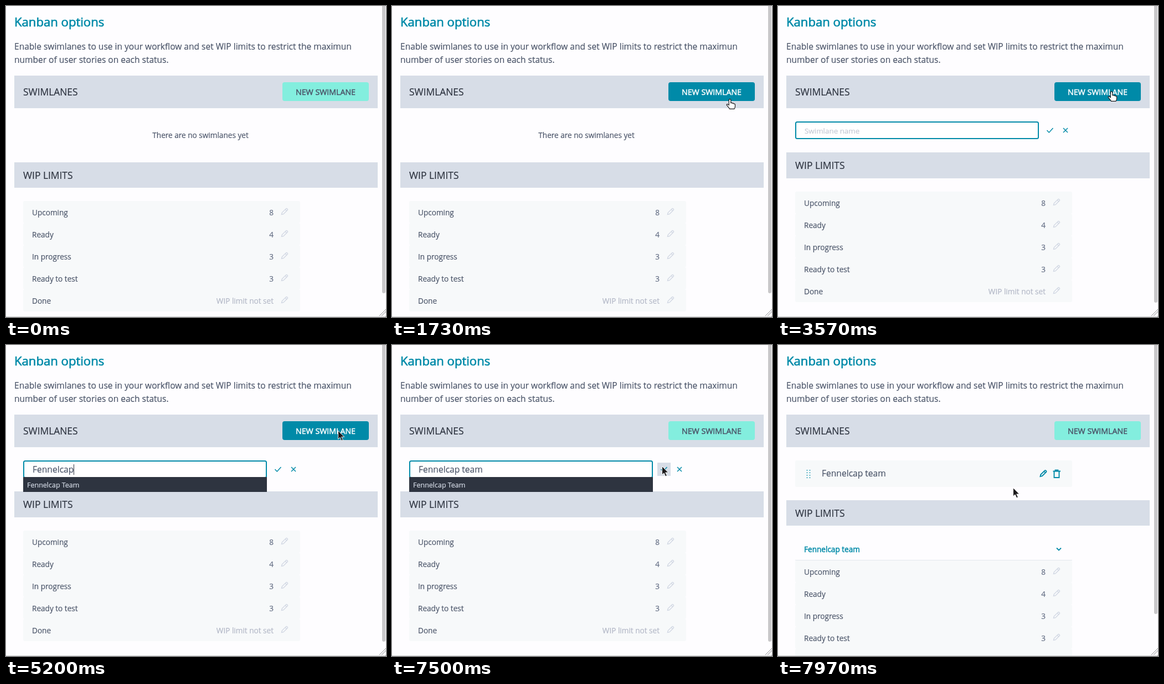
Recreate the animation shown at these times as an HTML page. Size 686 px wide and 563 px high, loop 8 s.

```html
<!DOCTYPE html>
<html lang="en">
<head>
<meta charset="utf-8">
<title>Kanban options</title>
<style>
  html, body { margin: 0; width: 100%; height: 100%; overflow: hidden; background: #fefdff; }
  svg { display: block; width: 686px; height: 563px; }
  text {
    font: 13.6px 'Open Sans', 'Noto Sans', sans-serif; white-space: pre;
    color: #4c566a; fill: currentColor; stroke: currentColor; stroke-width: .2;
  }
  .title { font-size: 22.1px; color: #008aa8; stroke-width: .7; }
  .body { font-size: 15.53px; }
  .head { font-size: 17.4px; color: #2e3440; }
  .medium { stroke-width: .5; }
  .bar { fill: #d7dde7; }
  .row { fill: #f7f9fa; }
  .icon { fill: none; stroke: #008aa8; stroke-width: 1.5; }
  .bold { stroke-width: 1.9; }
  .pale { stroke: #d0d6e2; stroke-width: 1.3; }
</style>
</head>
<body>
<svg viewBox="0 0 686 563">
  <defs>
    <path id="pencil" d="M1 12l.8-3.4L9 1.4q1-.9 2 0l.6.6q.9 1 0 2L4.400 11.200zM7.600 2.800l2.600 2.600"/>
  </defs>

  <text class="title" x="15" y="37">Kanban options</text>
  <text class="body" x="15" y="79">Enable swimlanes to use in your workflow and set WIP limits to restrict the maximun</text>
  <text class="body" x="15" y="103">number of user stories on each status.</text>

  <rect class="bar" x="15" y="126" width="656" height="59"/>
  <text class="head" x="31" y="162">SWIMLANES</text>
  <rect id="button" x="499" y="138" width="156" height="34" rx="4"/>
  <text id="label" class="medium" x="577" y="161" text-anchor="middle" style="font-size:14.2px">NEW SWIMLANE</text>

  <text id="empty" x="351" y="239" text-anchor="middle">There are no swimlanes yet</text>

  <rect id="wipBar" class="bar" x="15" width="656"/>
  <text id="wipHead" class="head" x="31">WIP LIMITS</text>
  <g id="rows"></g>

  <g id="form">
    <rect id="field" x="32" y="210" width="438" height="30" rx="2.5" fill="#fff" stroke-width="2"/>
    <text id="hint" x="48" y="231" style="font-size:13.4px;color:#c4c8d3">Swimlane name</text>
    <text id="typed" x="48" y="231" style="font-size:15.6px"></text>
    <rect id="caret" y="216" width="1" height="19" fill="#2e3440"/>
    <rect id="checkBack" class="bar" x="479" y="213" width="24" height="24"/>
    <path class="icon" d="M485.5 225l3.800 4 7.200-8M515 221l8 8m0-8l-8 8"/>
    <g id="suggest">
      <rect x="31" y="239" width="440" height="27" fill="#2e3440"/>
      <text x="38" y="258" style="font-size:12.5px;color:#d8dee9">Fennelcap Team</text>
    </g>
  </g>

  <g id="lane">
    <rect class="row" x="31" y="209" width="500" height="48" rx="3"/>
    <path d="M52.500 226v16m5-16v16" stroke="#008aa8" stroke-width="1.6" stroke-dasharray="1.600 2.900"/>
    <text x="79" y="238" style="font-size:15.6px">Fennelcap team</text>
    <use href="#pencil" class="icon bold" x="472.500" y="226"/>
    <path class="icon bold" d="M496.500 228.500h13.500m-9.500 0v-2h5v2m-7 0v11.500h9v-11.500"/>
    <text class="medium" x="47" y="375" style="color:#008aa8">Fennelcap team</text>
    <path class="icon bold" d="M503 367.500l4 4 4-4"/>
    <path d="M31 389.500h500" stroke="#e3e8ed"/>
  </g>

  <rect id="thumb" x="679" y="-6" width="6" rx="3" fill="#c8c7c9"/>
  <path d="M674 561l12-12m-8 12l8-8m-4 12l4-4" stroke="#8d8d8f" fill="none"/>
  <path d="M0 562.500h686" stroke="#d3d3d5"/>

  <g id="cursor">
    <path id="arrow" d="M0 0v15.500l3.500-3.200 2.700 6 2.700-1.200-2.700-5.700h5z" fill="#1c1a1c" stroke="#fff" stroke-width=".9"/>
    <path id="hand" d="M-1.700 1.500a1.700 1.700 0 0 1 3.400 0V6.500Q3.500 5.800 4.600 7.200 6.200 6.600 7 8 9.300 7.600 9.500 9.800V13q0 2-1.600 4.400H-.5q-1-2-5-6.600-.8-2 1-2.200L-1.700 10.500z" fill="#fff" stroke="#1c1a1c" stroke-width="1.200"/>
  </g>
</svg>
<script>
const LOOP = 8000;
const OPEN = 2330, TYPE = 3930, BLUR = 7530, SAVE = 7770;
const name = 'Fennelcap team';
// when each letter of the name is typed
const keys = [3930, 4130, 4270, 4400, 4570, 4730, 4870, 5030, 5200, 5370, 5500, 6030, 6170, 6300];
// time, x, y of the pointer tip
const path = [
  [1000, 49, 18], [1400, 469, 241], [1570, 469, 241], [1730, 610, 169], [1890, 601, 154],
  [2829, 601, 154], [2830, 602, 155], [3929, 602, 155], [3930, 599.5, 155],
  [7070, 599.5, 155], [7500, 487.5, 219.5], [7770, 487.5, 219.5], [7970, 424.5, 258.5]
];
// layout: empty, form, saved
const layouts = [
  { bar: 283, barH: 46, rows: 353, thumb: 520 },
  { bar: 265, barH: 47, rows: 336, thumb: 537 },
  { bar: 281, barH: 46, rows: 390, thumb: 487 }
];

const $ = id => document.getElementById(id);
const show = (id, on) => $(id).style.display = on ? '' : 'none';
const set = (id, attrs) => { for (const k in attrs) $(id).setAttribute(k, attrs[k]); };
const clamp = v => Math.max(0, Math.min(1, v));
const mix = (a, b, p) => a + (b - a) * p;
const within = (t, a, b) => t >= a && t < b;

const limits = [['Upcoming', 8], ['Ready', 4], ['In progress', 3], ['Ready to test', 3], ['Done', 0]];
$('rows').innerHTML = limits.map(([status, limit], i) => `
  <g transform="translate(0 ${i * 40})">
    <rect class="row" x="31" width="500" height="40" rx="3"/>
    <text x="47" y="26">${status}</text>
    <text x="483" y="26" text-anchor="end" style="color:${limit ? '#667086' : '#b3b8c7'}">${limit || 'WIP limit not set'}</text>
    <use href="#pencil" class="icon pale" x="496.5" y="12.500"/>
  </g>`).join('');

function pointer(t) {
  const i = path.findIndex(p => p[0] > t);
  if (i < 0) return path[path.length - 1].slice(1);
  const a = path[Math.max(0, i - 1)], b = path[i];
  const p = clamp((t - a[0]) / (b[0] - a[0]));
  return [mix(a[1], b[1], p), mix(a[2], b[2], p)];
}

function draw(t) {
  const stage = t < OPEN ? 0 : t < SAVE ? 1 : 2;
  const { bar, barH, rows, thumb } = layouts[stage];
  set('wipBar', { y: bar, height: barH });
  set('wipHead', { y: bar + 30 });
  set('rows', { transform: `translate(0 ${rows})` });
  set('thumb', { height: thumb + 6 });
  show('empty', stage === 0);
  show('form', stage === 1);
  show('lane', stage === 2);

  const [x, y] = pointer(t);
  const hover = within(x, 499, 655) && within(y, 138, 172);
  show('cursor', t >= 1000);
  set('cursor', { transform: `translate(${x} ${y})` });
  show('hand', hover && t < TYPE);
  show('arrow', !hover || t >= TYPE);
  set('button', { fill: hover ? '#008aa8' : '#83eede' });
  $('label').style.color = hover ? '#fff' : '#4c566a';

  if (stage !== 1) return;
  const count = keys.filter(k => k <= t).length;
  const focus = clamp((t - OPEN) / 300) * (1 - clamp((t - BLUR) / 70));
  const rgb = [[216, 0], [222, 138], [233, 168]].map(([a, b]) => Math.round(mix(a, b, focus)));
  set('field', { stroke: `rgb(${rgb})` });
  $('typed').textContent = name.slice(0, count);
  show('hint', !count);
  set('caret', { x: 48 + (count ? Math.round($('typed').getComputedTextLength()) : 0) });
  show('caret', t < 7100 && !within(t, 3570, TYPE) && !within(t, 5970, 6030));
  show('checkBack', within(x, 479, 503) && within(y, 213, 237));
  show('suggest', within(t, 4030, BLUR));
}

const start = performance.now();
function tick() {
  draw((performance.now() - start) % LOOP);
  requestAnimationFrame(tick);
}
tick();
</script>
</body>
</html>
```
